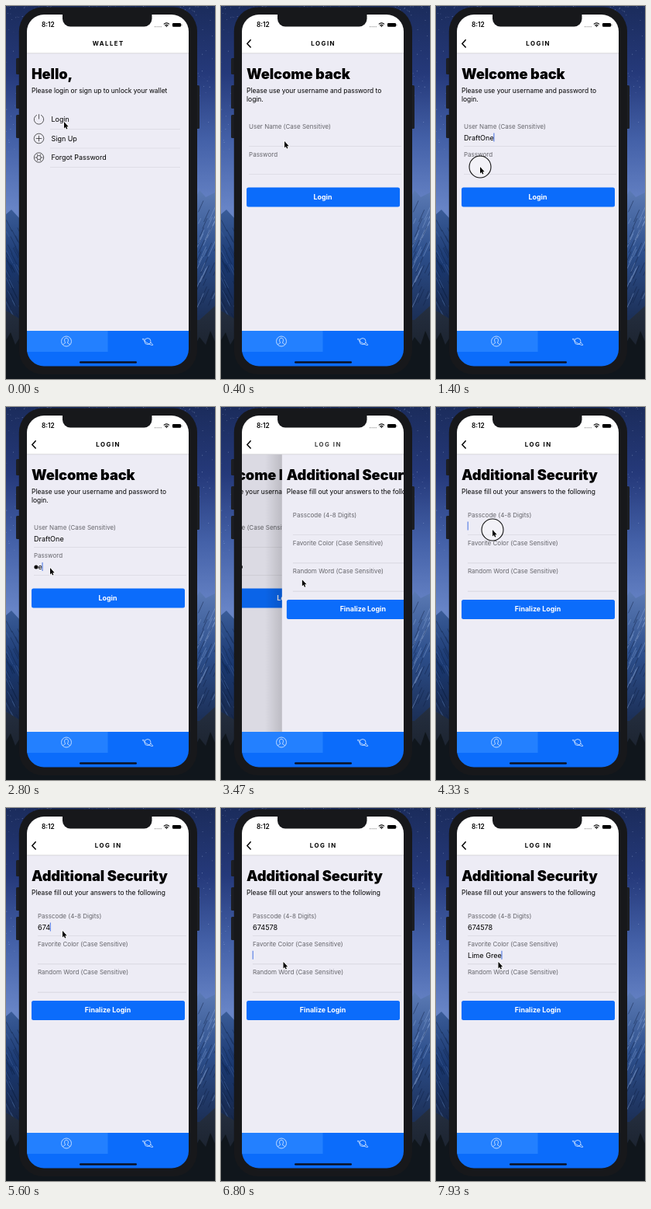
Write an HTML page with a canvas that moves like this. It is 270x480 px and loops after 8 s.

```html
<!DOCTYPE html>
<html lang="en">
<head>
<meta charset="utf-8">
<title>Wallet login</title>
<style>
html, body { margin: 0; width: 100%; height: 100%; overflow: hidden; background: #1b2c5a; }
canvas { display: block; width: 270px; height: 480px; }
</style>
</head>
<body>
<canvas id="stage"></canvas>
<script>
const LOOP = 8000, W = 270, H = 480;
const LEFT = 27, RIGHT = 236, PAGE = RIGHT - LEFT;
const BLUE = '#0b6cfb', INK = '#000', MUTED = '#65656b', BEZEL = '#17181b';
const canvas = document.getElementById('stage'), c = canvas.getContext('2d');
const dpr = window.devicePixelRatio || 1;
canvas.width = W * dpr;
canvas.height = H * dpr;

const clamp = x => Math.max(0, Math.min(1, x));
const smooth = x => x * x * (3 - 2 * x);
const slide = (t, start, length) => 1 - (1 - clamp((t - start) / length)) ** 4.25;
const typed = (text, t, start, step) =>
  text.slice(0, Math.max(0, Math.floor((t - start) / step) + 1));

function random(seed) {
  return () => (seed = seed * 16807 % 2147483647) / 2147483647;
}

function rect(x, y, w, h, fill, radius = 0) {
  c.fillStyle = fill;
  c.beginPath();
  c.roundRect(x, y, w, h, radius);
  c.fill();
}

function poly(points, fill) {
  c.fillStyle = fill;
  c.beginPath();
  for (let i = 0; i < points.length; i += 2) c.lineTo(points[i], points[i + 1]);
  c.fill();
}

function vertical(y0, y1, ...colors) {
  const g = c.createLinearGradient(0, y0, 0, y1);
  colors.forEach((color, i) => g.addColorStop(i / (colors.length - 1), color));
  return g;
}

function stroke(d, color, width) {
  c.strokeStyle = color;
  c.lineWidth = width;
  c.stroke(new Path2D(d));
}

function text(s, x, y, size, { weight = 400, color = INK, align = 'left', spacing = 0 } = {}) {
  c.font = `${weight} ${size}px Inter, sans-serif`;
  c.letterSpacing = spacing + 'px';
  c.textAlign = align;
  c.fillStyle = color;
  c.fillText(s, x, y);
  return c.measureText(s).width;
}

function at(x, y, draw) {
  c.save();
  c.translate(x, y);
  draw();
  c.restore();
}

const circle = (r, x = 0, y = 0) => `M${x - r} ${y}a${r} ${r} 0 1 0 ${2 * r} 0a${r} ${r} 0 1 0 ${-2 * r} 0`;
const rule = (x, y, end) => rect(x, y, end - x, 0.6, '#d0cfd7');
const caret = (x, y) => rect(x, y, 0.9, 11, '#2f62e0');

function wallpaper() {
  rect(0, 0, W, H, vertical(0, 260, '#1b2c5c', '#25397a', '#4461a8', '#6784c6'));
  const star = random(7);
  for (let i = 0; i < 420; i++) {
    rect(star() * W, star() ** 2 * 190, 0.8, 0.8, `rgba(205,220,255,${star() * 0.6})`);
  }
  poly([0, 268, 7, 262, 20, 276, 20, 420, 0, 420], vertical(262, 400, '#3a5c98', '#1a3870', '#18294c'));
  poly([240, 256, 250, 237, 258, 246, 270, 240, 270, 420, 240, 420],
    vertical(237, 400, '#5b7ab4', '#2d4f8c', '#1c3058'));
  const ridge = random(29);
  for (let i = 0; i < 45; i++) {
    const x = 246 + ridge() * 24, y = 265 + ridge() * 125, h = 6 + ridge() * 16;
    stroke(`M${x} ${y}l${h * 0.45} ${-h}`, i % 2 ? 'rgba(150,178,225,.4)' : 'rgba(14,30,66,.45)', 1);
    stroke(`M${x - 248} ${y + 10}l${h * 0.5} ${h}`, i % 3 ? 'rgba(12,28,62,.4)' : 'rgba(90,125,185,.3)', 1);
  }
  poly([0, 392, 20, 404, 250, 404, 270, 386, 270, 480, 0, 480], vertical(386, 480, '#252f40', '#151b24'));
  poly([0, 430, 6, 420, 12, 436, 18, 426, 40, 462, 230, 462, 250, 426, 258, 436, 264, 418, 270, 432, 270, 480, 0, 480], '#10161c');
}

function phone() {
  [[13, 67, 21], [13, 102, 30], [13, 140, 30], [244, 102, 56]]
    .forEach(([x, y, h]) => rect(x, y, 6, h, '#1c1e23', 1.5));
  rect(16.8, 1.5, 230.2, 472.5, BEZEL, 31);
}

function headings(title, ...lines) {
  text(title, 33, 94, 18.3, { weight: 900, spacing: -0.1 });
  lines.forEach((line, i) => text(line, 33, 112 + i * 10.7, 8.45));
}

function field(label, x, y, value = '', focused = false) {
  text(label, x, y, 8, { color: MUTED });
  const end = x + text(value, x, y + 14.5, 9.1);
  if (focused) caret(end - 0.3, y + 5.6);
  rule(x, y + 22.4, 233);
}

function button(label, y) {
  rect(33, y, 198, 25, BLUE, 2.5);
  text(label, 131.5, y + 15.4, 8.9, { weight: 700, color: '#fff', align: 'center' });
}

function homePage() {
  headings('Hello,', 'Please login or sign up to unlock your wallet');
  const spokes = [0, 60, 120, 180, 240, 300].map(a => {
    const x = Math.cos(a * Math.PI / 180), y = Math.sin(a * Math.PI / 180);
    return `M${2.6 * x} ${2.6 * y}L${5 * x} ${5 * y}`;
  }).join('');
  const icons = [
    'M-2.6 -5.7A6.2 6.2 0 1 0 2.6 -5.7M0 -6.8V-.5',
    circle(6.3) + 'M-3.8 0H3.8M0 -3.8V3.8',
    circle(6.2) + circle(2.6) + spokes
  ];
  ['Login', 'Sign Up', 'Forgot Password'].forEach((label, i) => {
    const y = 146 + i * 24.5;
    at(42.5, y, () => stroke(icons[i], '#333', 0.8));
    text(label, 58.5, y + 3.2, 8.95);
    rule(57, y + 12.2, 225);
  });
}

function loginPage(t) {
  headings('Welcome back', 'Please use your username and password to', 'login.');
  field('User Name (Case Sensitive)', 36, 158, typed('DraftOne', t, 830, 56), t > 740 && t < 1450);
  field('Password', 36, 194);
  const secret = typed('tearoom', t, 2670, 100);
  const hidden = t < 3300 ? Math.max(0, secret.length - 1) : secret.length;
  for (let i = 0; i < hidden; i++) rect(36.4 + i * 5.6, 203.4, 5, 5, INK, 2.5);
  const x = 36 + hidden * 5.6;
  const end = x + text(secret.slice(hidden), x, 208.8, 9.1);
  if (t > 1450 && t < 3300) caret(end - 0.3, 200);
  button('Login', 233.6);
}

function securityPage(t) {
  headings('Additional Security', 'Please fill out your answers to the following');
  field('Passcode (4-8 Digits)', 41, 142, typed('674578', t, 4950, 250), t > 4300 && t < 6650);
  field('Favorite Color (Case Sensitive)', 41, 178.2, typed('Lime Gree', t, 6900, 128), t >= 6650);
  field('Random Word (Case Sensitive)', 41, 214.4);
  button('Finalize Login', 248);
}

function page(draw, t, x) {
  at(x, 0, () => {
    rect(LEFT, 61, PAGE, 358, '#edecf5');
    draw(t);
  });
}

function pages(t, first, second) {
  const [under, over, p] = second > 0
    ? [loginPage, securityPage, second] : [homePage, loginPage, first];
  c.save();
  c.beginPath();
  c.rect(LEFT, 61, PAGE, 358);
  c.clip();
  if (p < 1) {
    page(under, t, -0.3 * PAGE * p);
    rect(LEFT, 61, PAGE, 358, `rgba(0,0,0,${0.1 * p})`);
  }
  if (p > 0) {
    const x = PAGE * (1 - p), edge = LEFT + x;
    const shade = c.createLinearGradient(edge - 22, 0, edge, 0);
    shade.addColorStop(0, 'rgba(0,0,0,0)');
    shade.addColorStop(1, 'rgba(0,0,0,.14)');
    if (p < 1) rect(edge - 22, 61, 22, 358, shade);
    page(over, t, x);
  }
  c.restore();
}

function header(first, second) {
  rect(LEFT, 11, PAGE, 50, '#fff');
  rect(LEFT, 60.6, PAGE, 0.6, '#c9c9ce');
  const title = (s, alpha, shift) => {
    c.globalAlpha = clamp(alpha);
    text(s, 132.2 + shift, 51.2, 7.8, { weight: 700, align: 'center', spacing: 1.5 });
    c.globalAlpha = 1;
  };
  title('WALLET', 1 - first * 1.4, -30 * first);
  title('LOGIN', second > 0 ? 1 - second * 1.4 : first, 25 * (1 - first) - 30 * second);
  title('LOG IN', second, 25 * (1 - second));
  c.globalAlpha = first;
  stroke('M38.6 43.2L33.8 48.4L38.6 53.6', INK, 1.5);
  c.globalAlpha = 1;
}

function statusBar() {
  text('8:12', 46, 27.2, 8.3, { weight: 600 });
  for (let i = 0; i < 4; i++) rect(192 + i * 2.5, 26, 1.3, 1.3, '#888', 0.6);
  stroke('M203.8 23.4Q207.4 20.4 211 23.4M205.3 25.2Q207.4 23.4 209.5 25.2', INK, 1.2);
  rect(206.5, 25.4, 1.8, 1.6, INK, 0.8);
  rect(215, 22, 11, 4.8, INK, 1.2);
  rect(226.5, 23.4, 0.8, 2, '#555');
  rect(73, 0, 115.5, 26.5, BEZEL, [0, 0, 10, 10]);
}

function tabs() {
  rect(LEFT, 418, PAGE, 46, BLUE);
  rect(LEFT, 418, 104.5, 27, '#2380ff');
  at(78, 431.5, () => stroke(circle(6.5) +
    'M-4.6 4.4C-3.6 2.6 -1.4 3 -1.4 1.6C-3.2 -1 -2.6 -4.2 0 -4.2C2.6 -4.2 3.2 -1 1.4 1.6C1.4 3 3.6 2.6 4.6 4.4',
    '#e4efff', 0.8));
  at(183, 431.5, () => stroke(circle(4) +
    'M-3.6 -2.2C-6.8 -4 -7.4 -3.2 -5.6 -1.6C-2 1.6 3 4.6 6 5C7.6 5 6.6 3.6 3.8 1.4', '#e4efff', 0.8));
  rect(95, 457.2, 74, 2.6, '#0b1020', 1.3);
}

const CURSOR = [
  [0, 75, 149], [150, 75, 149], [400, 82, 174], [700, 70, 167], [1250, 70, 167],
  [1390, 57, 207], [3120, 57, 207], [3230, 108, 245], [3380, 108, 245], [3600, 99.5, 183.5],
  [4200, 73, 158], [6300, 73, 158], [6600, 80.5, 198], [LOOP, 80.5, 198]
];
const CLICKS = [90, 740, 1400, 3290, 4290, 6640];

function pointer(t) {
  const i = CURSOR.findIndex(key => key[0] > t);
  const [t0, x0, y0] = CURSOR[i - 1], [t1, x1, y1] = CURSOR[i];
  const p = smooth((t - t0) / (t1 - t0));
  at(x0 + (x1 - x0) * p, y0 + (y1 - y0) * p, () => {
    if (CLICKS.some(click => Math.abs(t - click) < 75)) {
      rect(-14, -14, 28, 28, 'rgba(255,255,255,.35)', 14);
      stroke(circle(14), '#111', 1.1);
    }
    const arrow = 'M0 0V8.4L1.8 6.7L3.1 9.6L4.4 9L3.2 6.2H5.7Z';
    stroke(arrow, '#fff', 1.3);
    c.fillStyle = INK;
    c.fill(new Path2D(arrow));
  });
}

function draw(now) {
  const t = now % LOOP;
  const first = slide(t, 70, 380), second = slide(t, 3320, 540);
  c.setTransform(dpr, 0, 0, dpr, 0, 0);
  wallpaper();
  phone();
  c.save();
  c.beginPath();
  c.roundRect(LEFT, 11, PAGE, 452.5, 22);
  c.clip();
  pages(t, first, second);
  header(first, second);
  statusBar();
  tabs();
  c.restore();
  pointer(t);
  requestAnimationFrame(draw);
}
requestAnimationFrame(draw);
</script>
</body>
</html>
```
